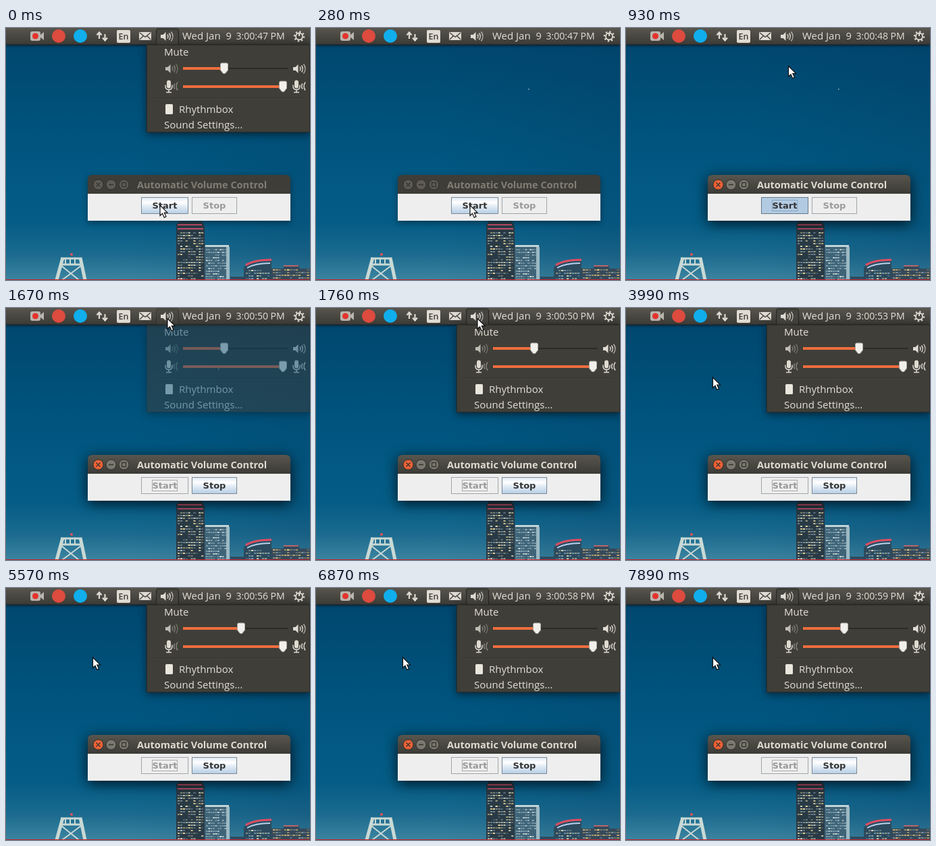
Animation of 450 by 374 pixels, one loop 8 s. Source, as an HTML page:

```html
<!DOCTYPE html>
<html lang="en">
<head>
<meta charset="utf-8">
<title>Automatic Volume Control</title>
<style>
  html, body { margin: 0; width: 450px; height: 374px; overflow: hidden; background: #00557f; }
  svg { display: block; }
  text { font: 500 15px "Open Sans", "Noto Sans", sans-serif; fill: #e3dfd6; white-space: pre; }
  #title { font-size: 14.5px; font-weight: 700; }
  .btn rect { stroke: #7a8a99; fill: url(#ocean); }
  .btn text { font: bold 13px "DejaVu Sans", sans-serif; fill: #333; }
  .btn .focus { fill: none; stroke: none; }
  .btn.focused .focus { stroke: #8ba5c0; }
  .btn.pressed .face { fill: #b2cbe2; stroke: #64798d; }
  .btn.off .face { fill: #eee; stroke: #a0a5aa; }
  .btn.off text { fill: #999; }
  .btn.off.focused .focus { stroke: #aaa; }
  #panel > rect:first-child { filter: drop-shadow(0 2px 2px rgba(0, 0, 0, .6)); }
  #menu > rect:first-child { filter: drop-shadow(0 3px 6px rgba(0, 0, 0, .55)); }
  #win { filter: drop-shadow(0 3px 5px rgba(0, 0, 0, .4)); }
  #win.active { filter: drop-shadow(0 4px 10px rgba(0, 0, 0, .8)); }
  #win #bar { fill: #3e3d38; }
  #win #title { fill: #817d74; }
  #win .knob { fill: #5d5b54; stroke: #2f2e2a; }
  #win.active #bar { fill: url(#barFill); }
  #win.active #title { fill: #dfdbd2; }
  #win.active .knob { fill: #7b786f; }
  #win.active #close { fill: #ee6236; }
</style>
</head>
<body>
<svg width="450" height="374" viewBox="0 0 450 374">
  <defs>
    <linearGradient id="sky" x2="0" y2="1">
      <stop stop-color="#00456d"/><stop offset=".5" stop-color="#005680"/>
      <stop offset=".78" stop-color="#055d87"/><stop offset=".9" stop-color="#1c6b8f"/>
      <stop offset="1" stop-color="#3c84a0"/>
    </linearGradient>
    <linearGradient id="dusk">
      <stop offset=".4" stop-color="#08365a" stop-opacity="0"/><stop offset="1" stop-color="#08365a" stop-opacity=".2"/>
    </linearGradient>
    <linearGradient id="barFill" x2="0" y2="1"><stop stop-color="#57554d"/><stop offset="1" stop-color="#3c3b37"/></linearGradient>
    <linearGradient id="ocean" x2="0" y2="1">
      <stop stop-color="#dde8f3"/><stop offset=".3" stop-color="#fff"/>
      <stop offset=".6" stop-color="#dde8f3"/><stop offset="1" stop-color="#b8cfe5"/>
    </linearGradient>
    <path id="cone" d="M0-2.500h3.500l4-4v13l-4-4h-3.500z" fill="#dfdbd2"/>
    <g id="waves" fill="none" stroke="#dfdbd2" stroke-width="1.400">
      <path d="M10-3q2 3 0 6M12.500-5q3.500 5 0 10"/><path d="M15.500-7q5 7 0 14" opacity=".75"/>
    </g>
    <g id="mic" fill="none" stroke="#dfdbd2" stroke-width="1.500">
      <rect x="3" y="-9" width="6" height="12" rx="3" fill="#dfdbd2" stroke="none"/>
      <path d="M1-2v2q0 5 5 5t5-5v-2M6 5v4M2 9h8"/>
    </g>
    <path id="micWaves" fill="none" stroke="#dfdbd2" stroke-width="1.500" d="M15-4q-3 4 0 8M19-6q-4 6 0 12"/>
    <path id="thumb" d="M-5.500-6q0-2 2-2h7q2 0 2 2v8.500l-4 5h-3l-4-5z" fill="#f2f0ec" stroke="#aaa69d"/>
  </defs>

  <rect width="450" height="374" fill="url(#sky)"/>
  <rect width="450" height="374" fill="url(#dusk)"/>
  <rect x="314" y="90" width="1.500" height="1.500" fill="#9dbccb"/>

  <g id="bridge" fill="none" stroke="#c9d9d5">
    <path d="M84 341L75 374M110 341L117 374" stroke-width="5"/>
    <path d="M81 342h31M79 351h35" stroke-width="3"/>
    <path d="M82 353L108 374M111 353L83 374M88 342v9M95 342v9M102 342v9" stroke-width="2"/>
    <circle cx="97" cy="336" r="2" fill="#e95056" stroke="none"/>
  </g>
  <g id="city">
    <path d="M252 374V292l4-5h34l4 7v80z" fill="#2a3a45"/>
    <path d="M254 292h36M254 298h38" stroke="#c0506a" stroke-width="2"/>
    <path d="M294 374V323h37v51z" fill="#3f6478"/>
    <path d="M295 323.500h35" stroke="#dce7e6" stroke-width="2.500"/>
    <path d="M326 325h5v49h-5z" fill="#9db9c3"/>
    <path d="M352 374V355q12-9 41-9v28z" fill="#2c4a5d"/>
    <path d="M355 352q12-8 38-8" fill="none" stroke="#e04c60" stroke-width="3"/>
    <path d="M357 356q12-7 34-7" fill="none" stroke="#b9d3ee" stroke-width="2"/>
    <path d="M393 374v-17h18v-5h23v5h16v17z" fill="#35495a"/>
    <path d="M411 353h22" stroke="#b8656c" stroke-width="2"/>
    <path d="M332 374v-5h20v5z" fill="#2c4c60"/>
  </g>
  <path d="M0 373.500h450" stroke="#c5222a"/>

  <g id="win">
    <path id="bar" d="M121 246v-21q0-7 7-7h286q7 0 7 7v21z"/>
    <rect x="121" y="246" width="300" height="40" fill="#eee"/>
    <circle id="close" class="knob" cx="136.500" cy="232.500" r="7.500"/>
    <circle class="knob" cx="155.500" cy="232.500" r="7.500"/>
    <circle class="knob" cx="174.500" cy="232.500" r="7.500"/>
    <path d="M133.500 229.500l6 6m0-6l-6 6M152 232.500h7M171.500 229.500h6v6h-6z" fill="none" stroke="#35342f" stroke-width="1.300"/>
    <text id="title" x="194" y="238">Automatic Volume Control</text>
    <g id="start" class="btn">
      <rect class="face" x="200.500" y="251.500" width="69" height="24"/>
      <rect class="focus" x="216.500" y="255.500" width="37" height="16"/>
      <text x="235" y="268" text-anchor="middle">Start</text>
    </g>
    <g id="stop" class="btn">
      <rect class="face" x="275.500" y="251.500" width="66" height="24"/>
      <text x="308.500" y="268" text-anchor="middle">Stop</text>
    </g>
  </g>

  <g id="panel">
    <rect width="450" height="24" fill="url(#barFill)"/>
    <path d="M0 24.500h450" stroke="#292824"/>
    <path id="lit" d="M222.500 25V4q0-3 3-3h27q3 0 3 3v21z" fill="#45443e" stroke="#24231f"/>
    <rect x="36" y="5" width="15" height="14" rx="3" fill="#b9b5ad"/>
    <path d="M50 11l6-5v12l-6-5z" fill="#b9b5ad"/>
    <circle cx="43.500" cy="12" r="4.500" fill="#e5322d"/>
    <circle cx="78" cy="12" r="10" fill="#dd4b3e"/>
    <circle cx="110" cy="12" r="10" fill="#10aeec"/>
    <path d="M138 16V7M134.500 10.500l3.500-4 3.500 4M146.500 9v9M143 14.500l3.500 4 3.500-4" fill="none" stroke="#dfdbd2" stroke-width="2.200"/>
    <rect x="164" y="3" width="20" height="19" rx="2" fill="#dfdbd2"/>
    <text x="174" y="17" text-anchor="middle" style="font-size:12.5px;font-weight:600;fill:#3c3b37">En</text>
    <rect x="197" y="6" width="18" height="12" rx="1" fill="#dfdbd2"/>
    <path d="M198 7l8 6.500 8-6.500M198 17l5.500-5.500M214 17l-5.500-5.500" fill="none" stroke="#3c3b37" stroke-width="1.300"/>
    <use href="#cone" x="229" y="12.500"/><use href="#waves" x="229" y="12.500"/>
    <text x="261" y="17">Wed Jan</text>
    <text x="325.500" y="17" style="font-size:14.5px">9</text>
    <text id="clock" x="340.500" y="17" style="font-size:14px"></text>
    <g fill="none" stroke="#dfdbd2">
      <circle cx="434" cy="12.500" r="5" stroke-width="1.800"/>
      <circle cx="434" cy="12.500" r="7" stroke-width="2.500" stroke-dasharray="2.200 3.298"/>
      <path d="M434 7v5" stroke-width="2"/>
    </g>
  </g>

  <g id="menu">
    <rect x="208.500" y="25" width="241" height="129.500" fill="#3f3e38" stroke="#2b2a26"/>
    <text x="234" y="41">Mute</text>
    <use href="#cone" x="236" y="60.500" opacity=".8"/><use href="#waves" x="236" y="60.500" opacity=".4"/>
    <use href="#cone" x="425" y="60.500"/><use href="#waves" x="425" y="60.500"/>
    <use href="#mic" x="235" y="86.500"/><use href="#micWaves" x="235" y="86.500" opacity=".45"/>
    <use href="#mic" x="424" y="86.500"/><use href="#micWaves" x="424" y="86.500"/>
    <path d="M262 60h155M262 87h155" stroke="#2b2a26" stroke-width="2"/>
    <path id="level" stroke="#ee6d3f" stroke-width="4"/>
    <path d="M262 87h148" stroke="#ee6d3f" stroke-width="4"/>
    <use id="volume" href="#thumb" y="60"/>
    <use href="#thumb" x="410" y="87"/>
    <path d="M218 104.500h222" stroke="#34332e"/><path d="M218 105.500h222" stroke="#484740"/>
    <rect x="236" y="113" width="11" height="15" rx="1.500" fill="#e9e6dd"/>
    <text x="256" y="126">Rhythmbox</text>
    <text x="234" y="149">Sound Settings…</text>
  </g>

  <path id="cursor" d="M0 0v15.500l3.500-3.300 2.700 6 2.800-1.300-2.700-5.700h4.700z" fill="#fff" stroke="#111" stroke-width="1.200"/>
</svg>
<script>
const $ = id => document.getElementById(id);
const LOOP = 8000, TICK = 650 / 7;   // seven screen updates per clock second

// Lit windows: x, y, columns, rows, column gap, row gap, colours
let seed = 7;
const random = () => (seed = seed * 16807 % 2147483647) / 2147483647;
function windows(x, y, cols, rows, dx, dy, colors) {
  for (let i = 0; i < cols * rows; i++) {
    if (random() < .3) continue;
    const r = document.createElementNS("http://www.w3.org/2000/svg", "rect");
    const look = { x: x + i % cols * dx, y: y + Math.floor(i / cols) * dy, width: dx * .8, height: 2,
      fill: colors[Math.floor(random() * colors.length)], opacity: .3 + random() * .7 };
    for (const k in look) r.setAttribute(k, look[k]);
    $("city").append(r);
  }
}
windows(254, 303, 10, 18, 3.9, 4, ["#f0dfa0", "#c6d0bf", "#6d8795"]);
windows(296, 328, 9, 12, 3.4, 4, ["#e6eee6", "#c5dae0", "#7b9dae"]);
windows(355, 359, 9, 4, 4, 4, ["#e0dfba", "#7fa3b5"]);
windows(395, 358, 13, 4, 4.2, 4, ["#f5d27a", "#e0bf78", "#8ea4ab"]);

// Each row: tick, value(s)
const moves = [[7, 228, 263], [10, 240.5, 56.5], [13, 239, 15.5], [19, 239, 15.5], [25, 128.5, 103]];
const volumes = [[0, 323], [38, 331], [39, 321.5], [43, 345], [49, 350], [50, 354], [52, 356], [54, 357],
  [56, 342], [57, 354], [59, 351], [60, 348], [63, 366], [64, 326], [66, 322], [67, 327], [84, 325], [85, 323]];

function pointer(n) {
  const i = moves.findIndex(m => m[0] > n);
  if (i < 1) return (i ? moves.at(-1) : moves[0]).slice(1);
  const a = moves[i - 1], b = moves[i], p = (n - a[0]) / (b[0] - a[0]);
  return [1, 2].map(k => a[k] + (b[k] - a[k]) * p);
}

function draw(now) {
  const n = Math.floor(now % LOOP / TICK + .05);
  const open = n < 2 || n > 18 ? 1 : n === 2 || n === 18 ? .5 : 0;
  const volume = volumes.findLast(v => v[0] <= n)[1];
  const running = n >= 12, clicked = n >= 7;

  $("menu").setAttribute("opacity", open);
  $("lit").setAttribute("opacity", open);
  $("level").setAttribute("d", `M262 60H${volume}`);
  $("volume").setAttribute("x", volume);
  $("clock").textContent = `3:00:${47 + Math.floor((n + 3) / 7)} PM`;
  $("win").setAttribute("class", clicked ? "active" : "");
  $("start").setAttribute("class", "btn" + (running ? " off focused" : clicked ? " pressed focused" : ""));
  $("stop").setAttribute("class", running ? "btn" : "btn off");
  $("cursor").setAttribute("transform", `translate(${pointer(n)})`);
  requestAnimationFrame(draw);
}
requestAnimationFrame(draw);
</script>
</body>
</html>
```
